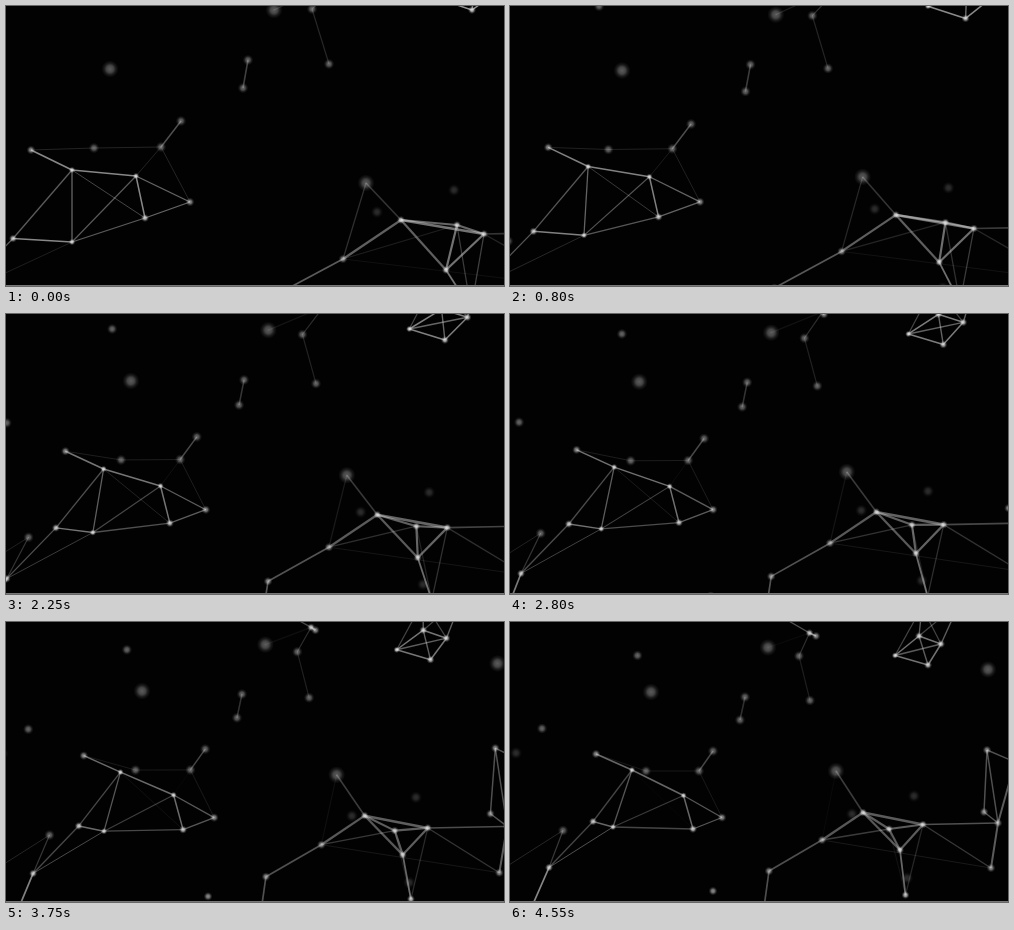
Write an HTML page with a canvas that moves like this. It is 498 px wide and 280 px high and loops after 4.6 s.

```html
<!DOCTYPE html>
<html lang="en">
<head>
<meta charset="utf-8">
<title>Drifting network</title>
<style>
  html, body { margin: 0; width: 100%; height: 100%; overflow: hidden; background: #020203; }
  canvas { display: block; }
</style>
</head>
<body>
<canvas id="stage" width="498" height="280"></canvas>
<script>
const LOOP = 4600, STEP = 50;
const ctx = document.getElementById('stage').getContext('2d');

// Glow radius and opacity
const KINDS = {
  sharp: [3.2, 0.95],
  dot: [4, 0.85],
  mid: [4.4, 0.62],
  soft: [5.2, 0.45],
  blob: [8.5, 0.4],
  faint: [6, 0.2],
  off: [0, 0]
};

// Nodes: x, y at the start, x, y at the end, kind.
// Links: opacity at the start, at the end, width, pairs of nodes.
const leftNet = {
  nodes: {
    a: [25, 144, 86, 132, 'mid'],
    b: [66, 164, 122, 148, 'sharp'],
    c: [130, 170, 173.5, 173.5, 'sharp'],
    d: [155, 141, 189, 149, 'soft'],
    e: [175, 115, 203, 129, 'soft'],
    f: [88, 142, 136, 149, 'soft'],
    g: [184, 196, 212, 195.5, 'mid'],
    h: [139, 212, 183, 207, 'dot'],
    i: [66, 236, 103, 205, 'sharp'],
    j: [7, 232.5, 83, 199.5, 'dot'],
    k: [-49, 289.5, 39, 245.5, 'dot'],
    l: [-17, 242.5, 53, 208.5, 'soft'],
    m: [104, 63, 141, 70, 'blob'],
    n: [78.5, -9, 127.5, 33.5, 'soft'],
    o: [-40, 112, 32, 106.5, 'soft'],
    p: [-66, 135, 6, 131, 'faint'],
    q: [196, 309, 203, 269, 'mid'],
    r: [-67, 351, 13, 305, 'off'],
    s: [-110, 300, -20, 255, 'off']
  },
  links: [
    [0.6, 0.45, 1.5, 'ab bc ch ij'],
    [0.45, 0.38, 1.3, 'bi cg hg'],
    [0.4, 0.3, 1.3, 'bj ih jk'],
    [0.4, 0.25, 1.1, 'ci'],
    [0.35, 0.3, 1.5, 'de'],
    [0.3, 0.02, 1, 'bh'],
    [0.15, 0.1, 1, 'af fd dg'],
    [0.14, 0, 1, 'dc'],
    [0.12, 0.35, 1, 'ik'],
    [0.2, 0.25, 1.2, 'lk'],
    [0.08, 0.16, 1, 'ls'],
    [0.4, 0.6, 1.7, 'kr']
  ]
};

const topNet = {
  nodes: {
    a: [242, 54, 235, 75, 'soft'],
    b: [237, 82, 230, 98, 'soft'],
    c: [268, 4, 258, 25.5, 'blob'],
    d: [306, 3, 289, 34, 'soft'],
    e: [323, 58, 300, 78.5, 'soft'],
    f: [341, -31, 299.5, 11, 'dot'],
    g: [331, -29, 306, 14, 'mid'],
    h: [285, -55, 265, -9, 'off'],
    i: [466, 4, 418, 43, 'dot'],
    j: [427, -9, 385, 33.5, 'sharp'],
    k: [501, -21, 431, 22, 'dot'],
    l: [470, -29, 409, 14, 'dot'],
    m: [500, -63, 450, -20, 'off'],
    n: [450, -58, 412, -15, 'off'],
    o: [578, 3, 478, 47.5, 'blob']
  },
  links: [
    [0.28, 0.2, 1.6, 'ab'],
    [0.17, 0.13, 1.2, 'de'],
    [0.2, 0.2, 1.2, 'df'],
    [0.14, 0.04, 1.2, 'cf'],
    [0.1, 0.35, 1.3, 'fh'],
    [0.5, 0.6, 1.7, 'fg'],
    [0.65, 0.5, 1.5, 'ij ik jl kl'],
    [0.5, 0.4, 1.4, 'il jk km ln'],
    [0.3, 0.3, 1.2, 'jn kn lm']
  ]
};

const rightNet = {
  nodes: {
    a: [360, 177, 326, 149, 'blob'],
    b: [395, 214, 353, 190.5, 'dot'],
    c: [451, 219, 379, 207, 'dot'],
    d: [478, 228, 413, 202.5, 'dot'],
    e: [440, 264, 390, 228, 'dot'],
    f: [337, 253, 312, 218, 'mid'],
    g: [448, 184, 404, 174, 'faint'],
    h: [371, 206, 342, 192, 'faint'],
    i: [266, 291, 259, 249, 'mid'],
    j: [465, 303, 395.5, 273, 'dot'],
    k: [443, 289, 397, 256, 'faint'],
    l: [568, 114, 477, 128, 'mid'],
    m: [551, 203, 474, 190, 'mid'],
    n: [585, 226, 488, 201, 'mid'],
    o: [572, 281, 481, 246, 'mid'],
    p: [600, 140, 505, 140, 'off'],
    q: [258, 335, 252, 300, 'off']
  },
  links: [
    [0.22, 0.26, 1.6, 'ab'],
    [0.2, 0.03, 1.3, 'af'],
    [0.42, 0.38, 2.2, 'bf be'],
    [0.5, 0.4, 2.6, 'bd'],
    [0.45, 0.4, 2.2, 'bc cd'],
    [0.5, 0.4, 2.2, 'ce de'],
    [0.4, 0.34, 1.7, 'fi iq'],
    [0.5, 0.45, 1.8, 'ej'],
    [0.12, 0.26, 1.3, 'fc'],
    [0.06, 0.1, 1, 'fo'],
    [0.25, 0.06, 1.3, 'cj'],
    [0.28, 0.16, 1.3, 'dj'],
    [0.22, 0.35, 1.6, 'dn'],
    [0.15, 0.24, 1.3, 'do'],
    [0.35, 0.35, 1.5, 'lm ln mn lp'],
    [0.4, 0.4, 2, 'no np']
  ]
};

const mix = (a, b, p) => a + (b - a) * p;
const grey = a => `rgba(225,225,225,${a})`;

function place([x0, y0, x1, y1], p) {
  return [mix(x0, x1, p), mix(y0, y1, p)];
}

function drawLink(from, to, alpha, width) {
  ctx.strokeStyle = grey(alpha);
  ctx.lineWidth = width;
  ctx.beginPath();
  ctx.moveTo(...from);
  ctx.lineTo(...to);
  ctx.stroke();
}

function drawGlow([x, y], [r, alpha]) {
  if (!r) return;
  const glow = ctx.createRadialGradient(x, y, 0, x, y, r);
  glow.addColorStop(0, grey(alpha));
  glow.addColorStop(0.4, grey(alpha * 0.75));
  glow.addColorStop(0.7, grey(alpha * 0.25));
  glow.addColorStop(1, grey(0));
  ctx.fillStyle = glow;
  ctx.fillRect(x - r, y - r, r * 2, r * 2);
}

function drawNet({ nodes, links }, p) {
  for (const [a0, a1, width, pairs] of links) {
    for (const [from, to] of pairs.split(' ')) {
      drawLink(place(nodes[from], p), place(nodes[to], p), mix(a0, a1, p), width);
    }
  }
  for (const node of Object.values(nodes)) {
    drawGlow(place(node, p), KINDS[node[4]]);
  }
}

function draw(ms) {
  const u = Math.floor(ms / STEP) * STEP / (LOOP - STEP);
  const p = u + 0.28 * u * (1 - u); // the drift slows down gently
  ctx.fillStyle = '#020203';
  ctx.fillRect(0, 0, 498, 280);
  for (const net of [leftNet, topNet, rightNet]) drawNet(net, p);
  ctx.fillStyle = '#777';
  ctx.fillRect(0, 279, 498, 1);
}

const startTime = performance.now();
function tick() {
  draw((performance.now() - startTime) % LOOP);
  requestAnimationFrame(tick);
}
tick();
</script>
</body>
</html>
```
